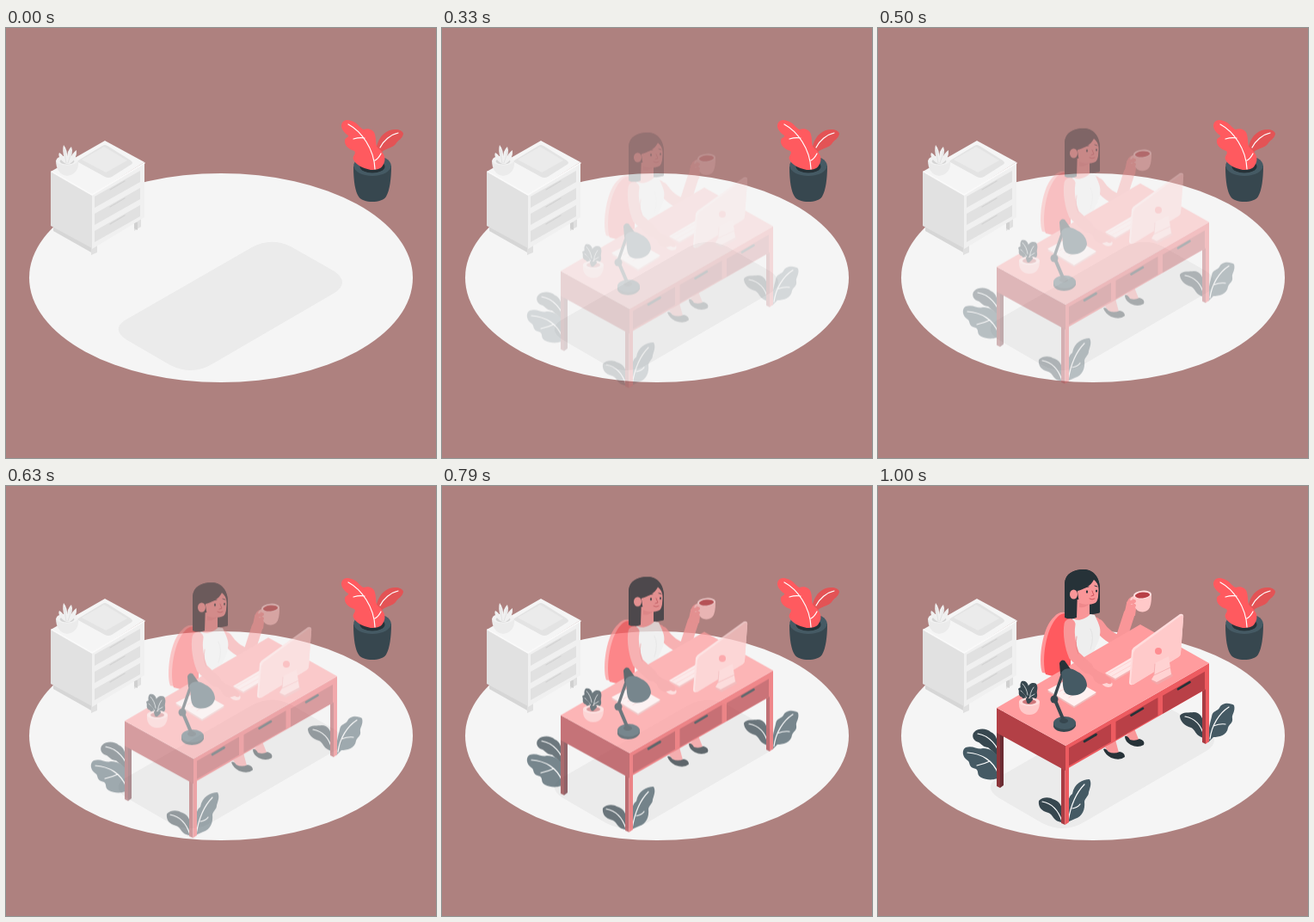
Write an HTML page with a canvas that moves like this. It is 500x500 px and loops after 1040 ms.

```html
<!DOCTYPE html>
<html lang="en">
<head>
<meta charset="utf-8">
<title>Desk scene</title>
<style>
html, body { margin: 0; width: 100%; height: 100%; overflow: hidden; background: #ae817f; }
canvas { display: block; width: 100vw; height: 100vh; }
</style>
</head>
<body>
<canvas id="stage" width="500" height="500"></canvas>
<script>
const SIZE = 500, LOOP = 1040, STEP = 1000 / 24, RISE = 30;
const INK = '#263238', SLATE = '#37474f', STEEL = '#455a64';
const RED = '#ff5a5f', SKIN = '#f99698', PALE = '#ffc9c9';

function layer() {
  const c = document.createElement('canvas');
  c.width = c.height = SIZE;
  return c.getContext('2d');
}

let g;

function fill(color, d) {
  g.fillStyle = color;
  g.fill(new Path2D(d));
}

function line(color, width, d) {
  g.strokeStyle = color;
  g.lineWidth = width;
  g.lineCap = g.lineJoin = 'round';
  g.stroke(new Path2D(d));
}

function oval(color, x, y, rx, ry, turn = 0) {
  g.fillStyle = color;
  g.beginPath();
  g.ellipse(x, y, rx, ry, turn, 0, Math.PI * 2);
  g.fill();
}

// Upright panel running along a slanted edge.
function panel(color, x1, y1, x2, y2, h) {
  fill(color, `M${x1},${y1}L${x2},${y2}V${y2 + h}L${x1},${y1 + h}Z`);
}

function leaf(color, shape, veins, width = 1.2) {
  fill(color, shape);
  line('#fff', width, veins);
}

function drawRoom() {
  g.fillStyle = '#ae817f';
  g.fillRect(0, 0, SIZE, SIZE);
  oval('#f5f5f5', 250, 290.5, 223, 121.5);
  fill('#ebebeb', 'M138,340L286,255Q308,243 331,254L382,283Q400,296 382,308L241,390Q217,405 191,392L141,363Q122,351 138,340Z');
  drawCabinet();
  drawRedPlant();
}

function drawCabinet() {
  fill('#d6d6d6', 'M55,230L101,256V262L55,236Z');
  panel('#e0e0e0', 99, 255, 106, 252, 9);
  panel('#e0e0e0', 149, 226, 157, 221, 10);
  fill('#d0d0d0', 'M149,226V233L153,235V226Z');
  fill('#f5f5f5', 'M52,167L115,131L161,156L100,194Z');
  fill('#e1e1e1', 'M52,167L100,194V256L52,230Z');
  panel('#f0f0f0', 100, 194, 161, 157, 63);
  for (let i = 0; i < 3; i++) {
    const y = 196 + i * 20;
    panel('#e1e1e1', 103, y, 156, y - 30, 13);
    line('#d3d3d3', 1.4, `M121,${y - 8}L138,${y - 18}`);
  }
  line('#fafafa', 1.5, 'M53,167L100,194L161,157');
  fill('#e3e3e3', 'M84,154L112,137Q115,135 118,137L145,154Q149,157 145,159L123,173Q119,175 115,173L84,156Z');
  fill('#ebebeb', 'M88,153L114,138L141,154L116,168Z');

  fill('#ebebeb', 'M58,154Q71,147 84,154C85,163 81,171 71,172C62,171 58,163 58,154Z');
  oval('#f2f2f2', 71, 154, 12.5, 5.5);
  oval('#d5d5d5', 71, 155, 8.5, 3.5);
  fill('#f0f0f0', 'M70,158C63,154 60,148 62,145Q66,147 68,152Q65,142 67,136Q72,142 71,152Q71,142 76,138Q79,145 73,155Q77,145 82,142Q83,152 74,158Z');
  line('#dcdcdc', .7, 'M70,157Q68,148 68,141M72,157Q75,149 76,143');
}

function drawRedPlant() {
  fill(SLATE, 'M404,161C404,178 406,190 410,196C415,204 437,204 442,196C446,189 448,176 448,160Z');
  oval(STEEL, 426, 160, 21.8, 12);
  oval(INK, 426, 161, 14.5, 7.5);
  leaf('#e35355', 'M430,145C431,132 436,123 446,119C453,117 461,118 462,123C461,129 456,130 453,135C448,141 438,139 433,150Z', 'M435,139C439,131 447,124 456,122');
  leaf(RED, 'M424,165C414,163 406,158 404,153C402,149 408,146 405,143C398,141 393,136 394,130C395,127 399,127 398,125C392,121 388,115 391,110C394,105 401,107 406,110C410,112 412,117 416,118C421,116 428,118 429,124C431,131 429,137 433,140C440,145 443,153 438,160C436,164 431,165 424,165Z',
    'M398,112C413,120 428,140 429,164M404,129Q411,127 417,128M429,154Q433,152 436,146');
}

function drawGreens() {
  leaf(SLATE, 'M143,322C140,314 134,309 128,304C123,304 120,300 117,298C111,297 108,290 112,286C117,281 127,282 131,286C138,289 139,296 139,302C143,308 143,314 143,322Z', 'M116,288C129,290 140,302 143,317');
  leaf(STEEL, 'M142,337C138,343 126,342 120,339C114,336 118,332 114,329C104,327 108,321 104,319C98,315 97,307 102,304C110,301 116,307 122,305C131,305 140,311 142,320Z', 'M104,310C120,311 134,319 140,335M115,325Q124,323 130,320');
  leaf(STEEL, 'M384,298C383,284 387,273 388,268C389,261 395,262 397,258C400,251 410,252 414,255C416,262 411,266 412,270C413,276 408,277 407,281C406,290 396,292 390,292Z', 'M386,294C388,278 397,264 408,257M390,279Q398,276 404,277');
  leaf(SLATE, 'M379,293C368,290 370,284 364,281C356,279 351,273 351,267C354,262 363,264 367,263C375,263 378,270 380,280Z', 'M357,268C368,270 376,278 379,291');
}

function drawFrontGreens() {
  leaf(STEEL, 'M220,391C221,378 219,362 226,358C228,346 238,341 246,341C249,346 246,352 245,356C245,361 241,362 240,367C241,376 238,384 229,387Z', 'M221,390C224,372 231,356 240,347M226,375Q232,374 235,370');
  leaf(SLATE, 'M214,391C203,390 205,383 198,380C190,378 186,373 187,366C192,361 200,362 203,364C211,366 214,372 215,380Z', 'M191,367C203,369 210,378 214,390');
}

function drawChair() {
  fill('#ff9698', 'M191,217C186,203 191,163 205,152C209,147 216,145 221,149V222Z');
  fill(RED, 'M195,219C190,203 195,165 209,152C213,148 222,146 224,151V220L211,223Z');
}

function drawLegs() {
  fill(SKIN, 'M264,304L276,295L280,310L272,314Z');
  fill(SKIN, 'M288,291L298,282L304,297L294,299Z');
  fill(INK, 'M262,306Q265,304 268,309Q274,312 281,309Q287,310 287,315Q281,320 271,316Q264,312 262,306Z');
  fill(INK, 'M287,291Q290,290 293,295Q299,297 304,294Q311,296 309,301Q302,305 294,301Q287,297 287,291Z');
}

function drawBody() {
  fill(INK, 'M217,152V113C218,102 227,97 239,97C251,97 258,107 258,119V147Q250,150 238,150Z');
  fill(SKIN, 'M231,132H246V149L257,154L251,166L226,163L223,154L231,150Z');
  line(SKIN, 13, 'M256,161C263,172 273,179 282,180L292,149');
  fill(SKIN, 'M286,148C288,144 288,138 290,134C292,129 297,127 301,131L300,143L299,151Z');
  fill('#eeeeee', 'M226,153C230,158 240,156 247,149L252,150C255,157 260,165 258,173C257,183 250,190 250,197L228,215L223,184Z');
  line('#e0e0e0', .8, 'M247,166Q252,175 247,190');
}

function drawHead() {
  fill(SKIN, 'M231,117C237,110 246,107 251,108C258,113 258,128 255,134C251,139 241,138 234,136Z');
  fill('#ee888b', 'M234,136Q241,139 246,137Q241,142 234,141Z');
  fill(INK, 'M217,153V113C218,102 227,97 239,97C251,97 258,107 258,120Q256,113 251,109C247,117 239,120 232,122L231,153Q223,156 217,153Z');
  fill(INK, 'M257,117L258,147Q255,149 250,148V139Q255,136 256,129Z');
  oval(SKIN, 227.5, 126, 4.5, 5.5);
  oval(INK, 243, 123, 1.1, 1.7);
  oval(INK, 254, 122, 1, 1.6);
  line(INK, .9, 'M240,118L245,117M252,116L255,117');
  line('#c85057', .9, 'M249,122L251,127L248,128M246,131Q249,133 252,131');
}

function drawMug() {
  line(PALE, 2.5, 'M299,129C292,129 293,140 300,140');
  fill(PALE, 'M297,127C297,137 299,143 302,145C305,147 311,147 314,144C317,141 318,135 318,126Z');
  oval('#ffe0e0', 307.5, 126.5, 10.5, 4.8, -.1);
  oval('#b83f46', 307.5, 127, 8.6, 3.4, -.1);
  line(SKIN, 4, 'M291,136L298,134M291,141L298,139');
}

function leg(x, y, bottom, width, left = '#a83c43', right = '#ed5b60') {
  fill(left, `M${x},${y}H${x + width / 2}V${bottom}L${x},${bottom - 2}Z`);
  fill(right, `M${x + width / 2},${y}H${x + width}V${bottom - 3}L${x + width / 2},${bottom}Z`);
}

function drawDesk() {
  leg(138, 262, 351, 8, '#8c3439', '#6b2c33');
  leg(377, 216, 300, 8);
  leg(213, 306, 394, 9);
  fill('#b34046', 'M138,258L218,302V331L138,287Z');
  panel('#ed5b60', 218, 302, 385, 206, 28);
  for (let i = 0; i < 3; i++) {
    const x = 222 + i * 54.5, y = 304.5 - i * 30.4;
    panel('#b94047', x, y, x + 49, y - 28, 21);
    line(INK, 2.7, `M${x + 18},${y - 7.5}L${x + 31.5},${y - 15.5}`);
  }
  fill('#ff9c9e', 'M138,258L305,161L385,206L218,302Z');
}

function drawPapers() {
  fill('#efbcbc', 'M197,239L224,225L254,242L228,258Z');
  fill('#fff1f1', 'M197,237L224,223L254,240L228,256Z');
  line('#ffcfcf', .8, 'M211,239L224,232M216,242L230,235M222,246L235,238');
}

function drawComputer() {
  fill('#f5b4b5', 'M264,219L298,199L310,206L276,226Z');
  fill('#ffe6e6', 'M264,217.5L298,197.5L310,204L276,224Z');
  line('#ffcfcf', .8, 'M268,218L300,200M272,221L304,203');
  fill('#ffdcdc', 'M297,188L351,149Q356,148 355,153L352,194Q352,197 349,199L296,231Q292,232 292,228L295,191Z');
  fill('#ffcaca', 'M299,190L352,151Q356,149 355,154L352,194Q352,197 349,199L297,231Q294,231 294,228L297,194Z');
  oval('#ff8d91', 326, 192, 4, 4);
  fill('#f3a7a9', 'M319,224L340,215L343,221L325,231L318,227Z');
  fill('#ffd2d2', 'M322,206L338,198L341,219L324,228L318,225L321,220Z');
  line('#f4aaac', .8, 'M322,207L321,220L340,211');
}

function drawArm() {
  oval('#ffd5d5', 266, 229, 7, 4.5, .4);
  line(SKIN, 13, 'M223,161C221,172 224,188 228,197L244,212');
  line(SKIN, 9, 'M236,206L259,223');
  fill(SKIN, 'M252,214C260,216 270,222 272,228Q271,232 266,229L259,231Q251,228 250,222Z');
  line('#e98185', .7, 'M231,175Q229,187 233,195');
}

function drawDeskPlant() {
  leaf(SLATE, 'M175,252C168,251 170,246 166,245C162,242 165,239 163,236C166,232 173,236 174,241Z', 'M166,238Q173,242 174,251', .7);
  leaf(SLATE, 'M175,252C172,244 174,240 174,235C175,229 181,228 184,230C187,235 184,238 185,242C186,247 181,250 179,254Z', 'M176,252Q176,240 181,234M177,245L182,242', .7);
  leaf(SLATE, 'M174,246C167,240 163,232 167,227C174,225 176,233 175,238Z', 'M168,230Q173,235 174,243', .7);
  fill(PALE, 'M164,251C163,259 167,266 176,266C184,266 188,260 188,251Z');
  oval('#ffdada', 176, 251, 12, 5);
  oval('#cf777b', 176, 251, 8, 3);
  line(SLATE, 4, 'M174,248L175,251L178,248');
}

function drawLamp() {
  fill(SLATE, 'M204,276V280C207,288 226,288 230,279V275Z');
  oval(STEEL, 217, 275.5, 13, 7.5);
  oval(SLATE, 216, 273, 5, 3);
  line(SLATE, 4, 'M216,273L205,247');
  line(SLATE, 3.5, 'M205,246L216,214');
  oval(SLATE, 205, 248, 4.5, 4.5);
  fill(INK, 'M211,206Q213,201 217,203L224,213L212,219Z');
  fill(STEEL, 'M213,217C218,210 226,212 232,216C239,219 243,226 243,232C241,242 229,246 220,242C213,238 216,225 213,217Z');
}

function drawGroup() {
  drawGreens();
  drawChair();
  drawLegs();
  drawBody();
  drawHead();
  drawFrontGreens();
  drawDesk();
  drawPapers();
  drawComputer();
  drawArm();
  drawMug();
  drawDeskPlant();
  drawLamp();
}

function render(draw) {
  g = layer();
  draw();
  return g.canvas;
}

const room = render(drawRoom), group = render(drawGroup);
const view = document.getElementById('stage').getContext('2d');

// The group fades in while rising, with an accelerating curve.
function show(now) {
  const tick = Math.floor((now % LOOP + 4) / STEP);
  const p = tick < 4 ? 0 : Math.min(1, (tick / 23.5) ** 1.58);
  view.globalAlpha = 1;
  view.drawImage(room, 0, 0);
  view.globalAlpha = p;
  view.drawImage(group, 0, RISE * (1 - p));
}

let start;
function loop(now) {
  start ??= now;
  show(now - start);
  requestAnimationFrame(loop);
}
show(0);
requestAnimationFrame(loop);
</script>
</body>
</html>
```
